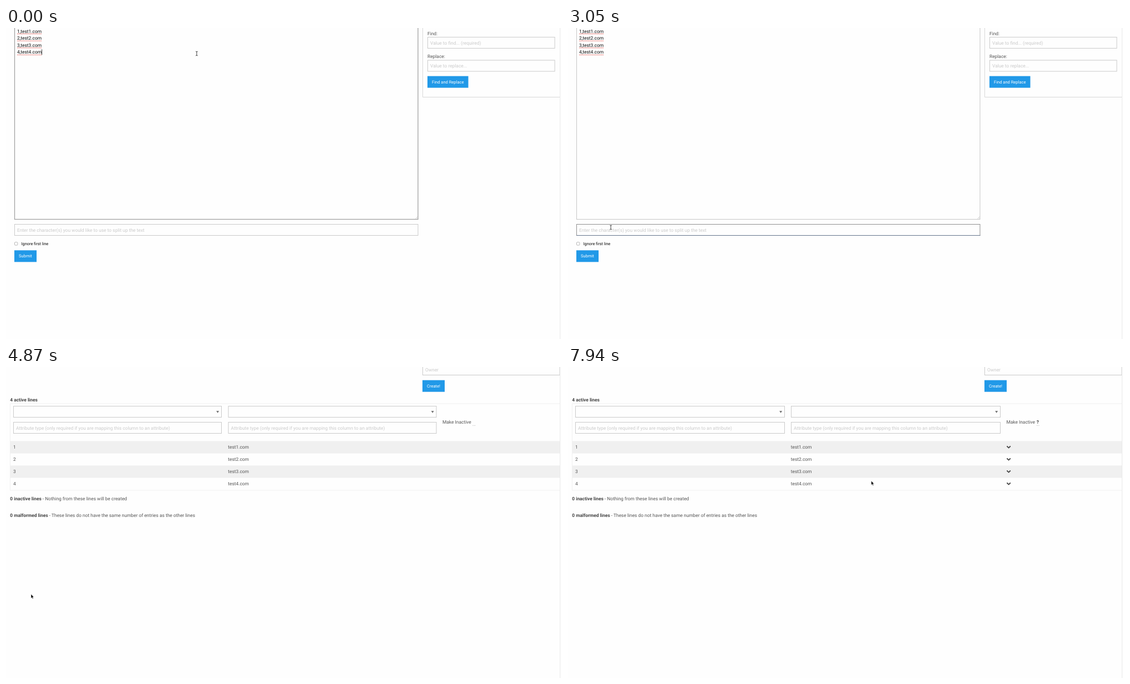
These frames come from a looping animation (1000x560 px, 8 s). An HTML page:

```html
<!DOCTYPE html>
<html lang="en">
<head>
<meta charset="utf-8">
<title>Bulk import form</title>
<style>
  html, body { margin: 0; height: 100%; overflow: hidden; background: #fefefe; }
  svg { display: block; width: 100vw; height: 100vh; }
  text { font: 8.4px Roboto, sans-serif; fill: #0a0a0a; white-space: pre; text-rendering: geometricPrecision; }
  .soft { fill: #555; }
  .hint { fill: #cacaca; }
  .btn { font-size: 7.56px; fill: #fefefe; }
  .small { font-size: 7.35px; }
  .bold { font-weight: 700; fill: #444; }
</style>
</head>
<body>
<svg id="stage" viewBox="0 0 1000 560"></svg>
<script>
const stage = document.getElementById('stage');
const LOOP = 8000, BLUE = '#2199e8', HOVER = '#1583cc', LINE = '#cacaca';

function add(parent, tag, attrs = {}, text) {
  const el = document.createElementNS('http://www.w3.org/2000/svg', tag);
  for (const k in attrs) el.setAttribute(k, attrs[k]);
  if (text !== undefined) el.textContent = text;
  parent.append(el);
  return el;
}
const group = (parent = stage) => add(parent, 'g');
const label = (g, x, y, text, cls = '') => add(g, 'text', { x, y, class: cls }, text);
const rect = (g, x, y, width, height, fill) => add(g, 'rect', { x, y, width, height, fill });
const path = (g, d, stroke, width = 1, fill = 'none') =>
  add(g, 'path', { d, stroke, 'stroke-width': width, fill });
function box(g, x, y, w, h, stroke = LINE) {
  const el = rect(g, x + .5, y + .5, w - 1, h - 1, '#fefefe');
  el.setAttribute('stroke', stroke);
  return el;
}
function button(g, x, y, w, text, dx = 8) {
  const el = rect(g, x, y, w, 21, BLUE);
  label(g, x + dx, y + 13, text, 'btn');
  return el;
}
const show = (el, on) => el.setAttribute('visibility', on ? 'inherit' : 'hidden');

// Form view
const form = group();
const area = box(form, 15, -20, 726.5, 365);
path(form, 'M736.5 343.5l4-4M739 343.5l1.5-1.5', '#aaa', .6);
const marks = [];
for (let i = 0; i < 4; i++) marks.push(rect(form, 20, 12.6 * i - .9, i < 3 ? 45.5 : 44.3, 12.6, '#fbdcae'));
for (let i = 0; i < 4; i++) {
  const y = 8.6 + 12.6 * i;
  label(form, 20, y, `${i + 1},test${i + 1}.com`);
  path(form, `M20 ${y + 2}H64`, '#e0362c', .9).setAttribute('stroke-dasharray', '1 .6');
}
const areaCaret = rect(form, 64.2, 38.4, .8, 10, '#111');

const split = box(form, 15, 353, 726.5, 21);
const splitBase = path(form, 'M15 373.5H741.5', '#64748b', 1);
const hint = label(form, 20, 366.5, 'Enter the character(s) you would like to use to split up the text', 'hint');
const comma = label(form, 20, 366.5, ',');
const splitCaret = rect(form, 20.1, 358.4, .8, 9.6, '#111');

add(form, 'rect', { x: 15.5, y: 385.7, width: 5.4, height: 5.4, rx: 1.2, fill: '#fff', stroke: '#999', 'stroke-width': .7 });
label(form, 27.6, 391, 'Ignore first line', 'small');
const submit = button(form, 15, 400.3, 40, 'Submit');

path(form, 'M749.5 0V124.5H996.5V0', '#d8d8d8');
label(form, 758, 12.6, 'Find:', 'soft');
box(form, 758, 16, 229.5, 21);
label(form, 763, 29.6, 'Value to find... (required)', 'hint');
label(form, 758, 54.3, 'Replace:', 'soft');
box(form, 758, 57.5, 229.5, 21);
label(form, 763, 71.1, 'Value to replace...', 'hint');
button(form, 758, 86.6, 73.5, 'Find and Replace');

// Table view
const result = group();
box(result, 749, -10, 247.5, 25);
label(result, 754, 8, 'Owner', 'hint');
button(result, 749, 23.7, 40, 'Create!');
label(result, 7.3, 62, '4 active lines', 'bold');
box(result, 7, 65.5, 990, 157, '#f1f1f1');
for (const y of [133.5, 177.5]) rect(result, 7.5, y, 989, 22, '#f0f0f0');
for (let i = 0; i < 4; i++) label(result, 13, 146.8 + 22 * i, i + 1, 'soft');

function columns(x2, width, x3, ready) {
  const g = group(result);
  for (const x of [13, x2]) {
    box(g, x, 70, width, 21);
    path(g, `M${x + width - 9.8} 79h5l-2.5 4z`, 'none', 0, '#777');
    box(g, x, 99, width, 21);
    label(g, x + 5, 112.6, 'Attribute type (only required if you are mapping this column to an attribute)', 'hint');
  }
  label(g, x3, 101.7, 'Make Inactive', 'soft');
  path(g, `M${x3 + 54} 105.3h6`, '#aaa', .6).setAttribute('stroke-dasharray', '1 .5');
  if (ready) label(g, x3 + 54.4, 101.7, '?', 'bold');
  for (let i = 0; i < 4; i++) {
    const y = 146.8 + 22 * i;
    label(g, x2 - .2, y, `test${i + 1}.com`, 'soft');
    if (ready) path(g, `M${x3 + 1} ${y - 4.3}l3.2 3.1 3.2-3.1`, '#444', 1.8);
  }
  return g;
}
const loading = columns(399.5, 375, 785, false);
const loaded = columns(401, 377, 788.4, true);

function note(y, strong, rest) {
  const el = label(result, 7.3, y, '', 'soft');
  add(el, 'tspan', { class: 'bold' }, strong);
  add(el, 'tspan', {}, rest);
}
note(240.3, '0 inactive lines', ' - Nothing from these lines will be created');
note(270.3, '0 malformed lines', ' - These lines do not have the same number of entries as the other lines');

path(stage, 'M996.5 0V560', '#e9e9e9');

// Pointer: a arrow, i text beam, h hand; capitals mean pressed
const pointer = group();
const ring = add(pointer, 'circle', { cx: .7, cy: -.7, r: 5.1, 'stroke-width': .8 });
const beam = 'M-1.8-3.8Q0-3.8 0-2.8Q0-3.8 1.8-3.8M0-3V3M-1.8 3.8Q0 3.8 0 2.8Q0 3.8 1.8 3.8';
const shapes = { a: group(pointer), i: group(pointer), h: group(pointer) };
path(shapes.a, 'M0 0V7.4L1.7 5.9 2.9 8.6 4.1 8.1 2.9 5.5H5.2Z', '#fff', .5, '#000');
path(shapes.i, beam, '#fff', 1.6);
path(shapes.i, beam, '#111', .8);
path(shapes.h, 'M-.9.8Q0-.5.9.8V3.4L3.6 4.1Q4.5 4.5 4.2 6L3.5 8.7H-.7L-3 5.4Q-2.6 4.2-1.7 5L-.9 5.7Z', '#111', .7, '#fff');

const moves = [
  [0, 343, 46, 'i'],
  [440, 310, 47, 'i'], [590, 205, 48, 'i'], [740, 115, 47, 'i'], [890, 82, 46, 'I'],
  [1040, 58, 34, 'I'], [1190, 24, 16, 'I'], [1340, 8, 6.4, 'A'],
  [1490, 8, 6.4, 'a'], [1640, 13, 28, 'a'], [1790, 30, 90, 'i'], [1940, 50, 175, 'i'],
  [2080, 65, 260, 'i'], [2230, 74, 325, 'i'], [2370, 77, 354, 'i'], [2520, 77, 359, 'I'],
  [2670, 77, 359, 'i'],
  [4120, 76, 363, 'i'], [4270, 69, 377, 'a'], [4420, 57, 396, 'a'], [4570, 47, 408, 'h'],
  [4720, 45.3, 409.3, 'H'], [4870, 45, 409, 'a'],
  [5250, 62, 378, 'a'], [5430, 118, 282, 'a'], [5580, 172, 165, 'a'], [5730, 192, 101.5, 'i'],
  [5880, 290, 125, 'a'], [6030, 277, 185, 'a'], [6180, 239, 216, 'a'],
  [6330, 262, 214, 'a'], [6480, 312, 206, 'a'], [6630, 364, 191, 'a'], [6780, 412, 178, 'a'],
  [6920, 451, 176, 'a'], [7070, 447, 186, 'a'], [7220, 431, 189, 'i'], [7360, 424, 187.5, 'i'],
  [7650, 449, 199, 'a'], [7790, 500, 207, 'a'], [7940, 545.4, 205, 'a']
];

const within = (t, a, b) => t >= a && t < b;

function draw(t) {
  const onForm = t < 4870;
  show(form, onForm);
  show(result, !onForm);
  show(loading, !onForm && t < 5010);
  show(loaded, t >= 5010);

  const selected = !within(t, 1040, 2520) ? 0 : t < 1190 ? 2 : t < 1340 ? 3 : 4;
  marks.forEach((el, i) => show(el, i >= 4 - selected));
  show(areaCaret, t < 140 || within(t, 740, 1040));

  // Focus passes from the text area to the split field
  const stepIn = t < 2520 ? 0 : t < 2670 ? 1 : 2;
  area.setAttribute('stroke', ['#a2a2a2', '#b4b4b4', '#c6c6c6'][stepIn]);
  area.setAttribute('stroke-width', stepIn ? 1 : 1.3);
  split.setAttribute('stroke', [LINE, '#aaa', '#8f8f8f'][stepIn]);
  splitBase.setAttribute('opacity', stepIn / 2);

  const typed = t >= 3680;
  show(hint, !typed);
  show(comma, typed);
  show(splitCaret, onForm && (within(t, 2520, 3050) || within(t, 3530, 4270) || t >= 4720));
  splitCaret.setAttribute('x', typed ? 21.5 : 20.1);
  submit.setAttribute('fill', t >= 4570 ? HOVER : BLUE);

  const [, x, y, kind] = moves.findLast(m => m[0] <= t);
  const shape = kind.toLowerCase();
  pointer.setAttribute('transform', `translate(${x} ${y})`);
  for (const k in shapes) show(shapes[k], k === shape);
  show(ring, kind !== shape);
  ring.setAttribute('fill', shape === 'h' ? HOVER : 'none');
  ring.setAttribute('stroke', shape === 'h' ? '#e4f1fb' : '#111');
}

const start = performance.now();
(function tick() {
  draw((performance.now() - start) % LOOP);
  requestAnimationFrame(tick);
})();
</script>
</body>
</html>
```
